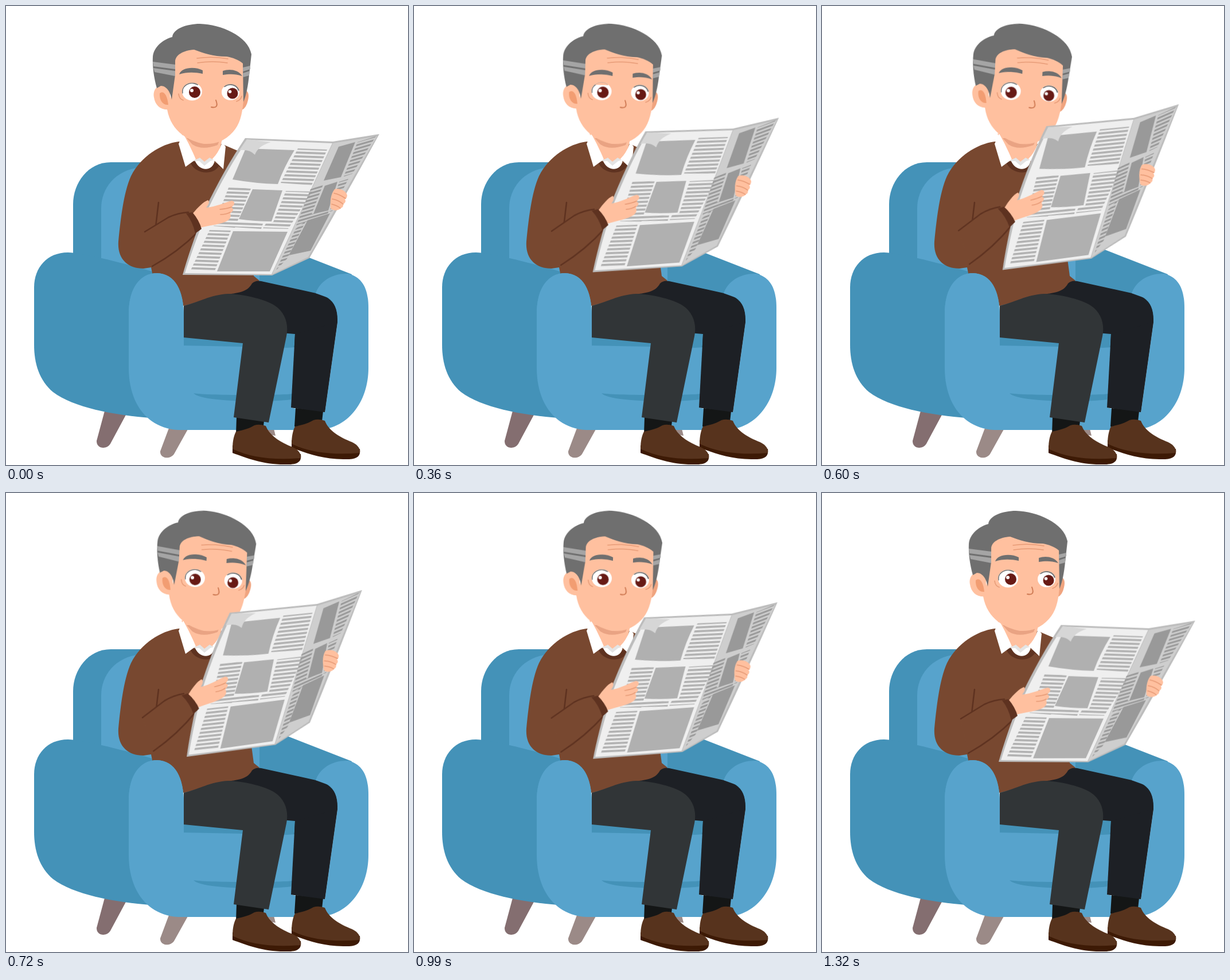
Write an HTML page without scripts that moves like this. It is 701 by 799 pixels and loops after 1.35 s.

```html
<!DOCTYPE html>
<html lang="en">
<head>
<meta charset="utf-8">
<title>Man reading a newspaper</title>
<style>
  html, body { margin: 0; width: 100%; height: 100%; overflow: hidden; background: #fff; }
  svg { display: block; width: 100vw; height: 100vh; }

  .light { fill: #57a3cc; }
  .dark { fill: #4492b8; }
  .wool { fill: #784830; }
  .rib { fill: #5e3220; }
  .skin { fill: #ffc09f; }
  .hair { fill: #6f6f6f; }
  .iris { fill: #671a15; }
  .white { fill: #fff; }
  .line { fill: none; stroke-linecap: round; stroke-width: 2; }
  .crease { stroke: #5e3220; stroke-width: 2.5; }
  .wrinkle { stroke: #e69a76; stroke-width: 1.6; }
  .lash { stroke: #6f6f6f; stroke-width: 3.4; }

  .paper, .forearm, .head, .gaze { animation: 1350ms cubic-bezier(.37, 0, .63, 1) -1332ms infinite; }
  .paper { animation-name: lift; transform-origin: 309px 467px; }
  .forearm { animation-name: bend; transform-origin: 220px 430px; }
  .head { animation-name: tilt; transform-origin: 345px 240px; }
  .gaze { animation-name: look; }
  .lid, .brows { animation: 1350ms linear infinite; }
  .lid { animation-name: blink; }
  .brows { animation-name: frown; }

  @keyframes lift { 50% { transform: translate(7px, -9px) rotate(-8deg); } }
  @keyframes bend { 50% { transform: rotate(-6deg); } }
  @keyframes tilt { 50% { transform: rotate(3.1deg); } }
  @keyframes look { 50% { transform: translate(-4px, 1.5px); } }
  @keyframes blink {
    0%, 7% { transform: none; animation-timing-function: ease-in-out; }
    16.5% { transform: translateY(30px); }
    18.5% { transform: translateY(30px); animation-timing-function: ease-out; }
    30.5%, 100% { transform: none; }
  }
  @keyframes frown {
    0%, 7% { transform: none; animation-timing-function: ease-in-out; }
    16.5% { transform: translateY(10px); }
    18.5% { transform: translateY(10px); animation-timing-function: ease-in-out; }
    33%, 100% { transform: none; }
  }
</style>
</head>
<body>
<svg viewBox="0 0 701 799" preserveAspectRatio="none">
  <defs>
    <pattern id="rows" width="60" height="6.7" patternUnits="userSpaceOnUse" patternTransform="translate(0 249) rotate(2)">
      <rect width="60" height="3.6" fill="#b0b0b0"/>
    </pattern>
    <pattern id="slant" width="60" height="5.8" patternUnits="userSpaceOnUse" patternTransform="rotate(-16)">
      <rect width="60" height="3" fill="#999"/>
    </pattern>
    <clipPath id="eyeL"><ellipse cx="324.500" cy="149" rx="17.500" ry="15.500"/></clipPath>
    <clipPath id="eyeR"><ellipse cx="391.500" cy="150" rx="15.500" ry="14"/></clipPath>
    <g id="shoe">
      <path fill="#3d1a05" d="M395 765L514 780C516 794 508 798 490 798C450 799 420 787 395 778Z"/>
      <path fill="#57331d" d="M401 741C415 738 425 735 433 730Q442 727 453 731C460 749 480 760 500 768C511 773 515 780 514 787Q440 793 395 771C395 760 397 748 401 741Z"/>
    </g>
  </defs>

  <!-- chair -->
  <path fill="#846e70" d="M172 705L210 710L182 762C176 772 158 772 158 757Z"/>
  <path fill="#9b8a87" d="M284 735L317 737L293 780C286 790 268 788 269 775ZM455 736H467L470 748L458 746Z"/>
  <path class="dark" d="M117 450V345C117 308 143 272 183 272H260V460H117Z"/>
  <path class="light" d="M166 450V352C166 318 190 285 235 281H300L442 400V490H166Z"/>
  <path class="dark" d="M442 408L485 421L603 467L560 600H310V480H442Z"/>
  <path class="dark" d="M49 490C49 455 72 429 108 429C130 429 200 446 265 465V718C190 713 120 700 82 672C58 652 49 622 49 590Z"/>

  <!-- torso and neck -->
  <path class="wool" d="M301 236C270 240 235 262 218 296C205 325 200 370 196 410C194 440 212 457 240 457L253 455L258 480L310 522C335 516 360 505 385 502C400 500 425 502 435 482L442 478L432 470L428 440L418 258L376 240Z"/>
  <path class="rib" d="M313 279L318 270L372 274L380 284L371 279C362 294 332 294 322 274Z"/>
  <path class="skin" d="M306 222H379L370 264L346 276L328 266Z"/>
  <path fill="#e9a383" d="M315 230H374L369 242Q342 252 325 241Z"/>
  <path class="white" d="M309 222L301 240L313 280L331 267Q322 245 309 222ZM377 237L383 245L379 284L360 266Q372 254 377 237Z"/>
  <path class="white" d="M329 268L338 265L346 272L355 265L364 268C362 288 337 290 329 268Z"/>
  <path fill="#e4e4e4" d="M327 270L338 264L346 271L355 264L362 268L356 270L346 278L337 270Z"/>

  <!-- legs -->
  <path fill="#1d2025" d="M375 503C400 500 420 500 429 483Q435 477 445 479L545 501C570 508 580 525 578 550L556 707L497 699L504 571L480 569Z"/>
  <path class="light" d="M214 535C214 490 235 465 263 465C295 466 310 495 310 540V591L410 593L490 595L504 594L500 700L556 707L578 550Q579 520 562 508L540 500C548 478 570 465 597 466C620 472 632 490 632 525V630C632 690 595 738 540 738H300C245 735 214 690 214 630Z"/>
  <path class="dark" d="M327 674C350 678 480 678 500 675L497 685C460 690 340 690 327 674Z"/>
  <path fill="#141616" d="M505 700L553 705L550 732H503ZM402 716L450 722L448 740L401 745Z"/>
  <path fill="#1d2025" d="M504 571L578 550L556 707L497 699Z"/>
  <path fill="#313537" d="M310 522C335 516 358 502 388 501C415 502 450 510 468 521C488 534 493 555 489 575L458 725L397 716L413 587L310 577Z"/>
  <use href="#shoe" x="103" y="-9"/>
  <use href="#shoe"/>

  <!-- head -->
  <g class="head">
    <path class="skin" d="M286 143C268 132 255 143 258 159C260 173 270 182 286 180Z"/>
    <path fill="#f29d72" d="M268 152C274 147 281 153 283 172C273 173 267 163 268 152Z"/>
    <path fill="#f0a47f" d="M412 148C421 144 425 152 422 164Q419 178 411 181Z"/>
    <path class="skin" d="M290 70H414V165C412 190 407 207 396 219C380 236 365 241 345 240C320 235 288 220 281 180L289 150Z"/>
    <path class="hair" d="M263 143C258 125 255 105 256 88C258 70 275 58 290 54C291 40 315 31 338 31C375 32 422 52 428 84L424 120C422 140 419 155 414 167L413 100C405 93 395 90 385 88C360 88 345 82 328 76C310 77 295 85 295 97V120L289 163C287 150 280 139 270 139Z"/>
    <path fill="#a5a5a5" d="M256 97L295 102V110L257 105ZM257 108L295 113V122L259 115ZM413 107L426 104V110L413 114ZM413 117L425 113L424 121L413 124Z"/>
    <path class="line wrinkle" d="M333 91Q360 87 387 92M334 99Q360 95 386 99M301 153Q302 162 309 164M411 157Q409 164 402 166"/>
    <path class="line" stroke="#cf7b55" d="M366 164C370 174 367 178 358 176"/>
    <g clip-path="url(#eyeL)">
      <path class="white" d="M300 130H345V170H300Z"/>
      <g class="gaze">
        <circle class="iris" cx="329" cy="150" r="10"/>
        <circle class="white" cx="324" cy="147" r="3"/>
      </g>
      <path class="line lash" d="M307 151A17.500 15.500 0 0 1 334 136"/>
      <path class="lid skin" d="M300 90H348V134H300Z"/>
    </g>
    <g clip-path="url(#eyeR)">
      <path class="white" d="M370 130H412V170H370Z"/>
      <g class="gaze">
        <circle class="iris" cx="395" cy="152" r="9.500"/>
        <circle class="white" cx="390.500" cy="149" r="2.800"/>
      </g>
      <path class="line lash" d="M381 139.500A15.500 14 0 0 1 406 146"/>
      <path class="lid skin" d="M370 90H412V132H370Z"/>
    </g>
    <path class="brows hair" d="M302 119C306 106 330 105 343 112V118C328 115 315 115 302 119ZM378 113C388 109 405 110 412 122C400 118 390 118 378 120Z"/>
  </g>

  <!-- arm -->
  <path class="line crease" d="M266 342L261 384"/>
  <g class="forearm">
    <path class="wool" d="M242 393L283 368Q305 357 320 360L336 393L255 453Z"/>
    <path class="line crease" d="M242 393L283 368Q300 360 318 359M255 453Q300 428 334 394"/>
  </g>

  <g class="paper">
    <path fill="#bcbcbc" d="M417 230L570 236L651 223L646 232Q590 334 529 439L464 469L308 468Q320 425 347 354Q380 285 417 230Z"/>
    <path fill="#efefef" d="M421 233L569 239L463 467L312 465Q326 420 352 354Q385 285 421 233Z"/>
    <path fill="#cecece" d="M570 239L647 227Q587 330 527 437L464 467Z"/>
    <g fill="#b0b0b0">
      <path d="M418 248L503 251Q485 280 474 310Q435 309 395 302Z"/>
      <path d="M430 319L482 321L463 375Q434 375 406 371Z"/>
      <path d="M396 392L491 393L460 462H368Z"/>
    </g>
    <path fill="url(#rows)" d="M509 248L560 250L533 312L479 308ZM389 314L427 318L399 386L362 383ZM488 322L534 323L492 388L448 387L453 379L466 376ZM355 390L392 391L364 461L322 460ZM404 375L448 379L445 388L398 385Z"/>
    <path fill="#999" d="M580 245L609 237L584 298L554 304ZM556 313L578 306L562 356L536 362ZM526 373L565 361L531 426L493 434Z"/>
    <path fill="url(#slant)" d="M613 237L645 227L604 292L589 297ZM531 319L553 311L533 362L563 357L560 363L506 382ZM581 306L597 301L569 357L564 358ZM505 388L523 374L490 440L471 460Z"/>
    <path fill="#d6d6d6" d="M420 232L462 237Q440 243 434 259Q425 249 407 251Z"/>
    <path class="skin" d="M573 319C582 316 594 322 595 330Q594 336 591 336Q594 342 588 345Q589 350 584 352C579 357 570 357 566 352C565 340 566 328 573 319Z"/>
    <path class="line wrinkle" d="M572 326Q582 328 592 335M569 336Q580 338 588 345M568 345Q577 347 583 352"/>
    <path class="skin" d="M325 362C335 350 344 341 352 338Q357 341 349 351C365 350 384 341 394 339Q403 342 393 351Q400 354 391 361Q394 369 386 374C375 380 360 381 338 386Z"/>
    <path class="line wrinkle" d="M373 354Q385 353 393 350M374 363Q384 363 391 359"/>
    <path class="rib" d="M325 359Q337 373 341 388L330 396Q326 376 314 361Z"/>
  </g>

  <path class="light" d="M214 535C214 490 235 465 263 465C295 466 310 495 310 540V600H214Z"/>
</svg>
</body>
</html>
```
